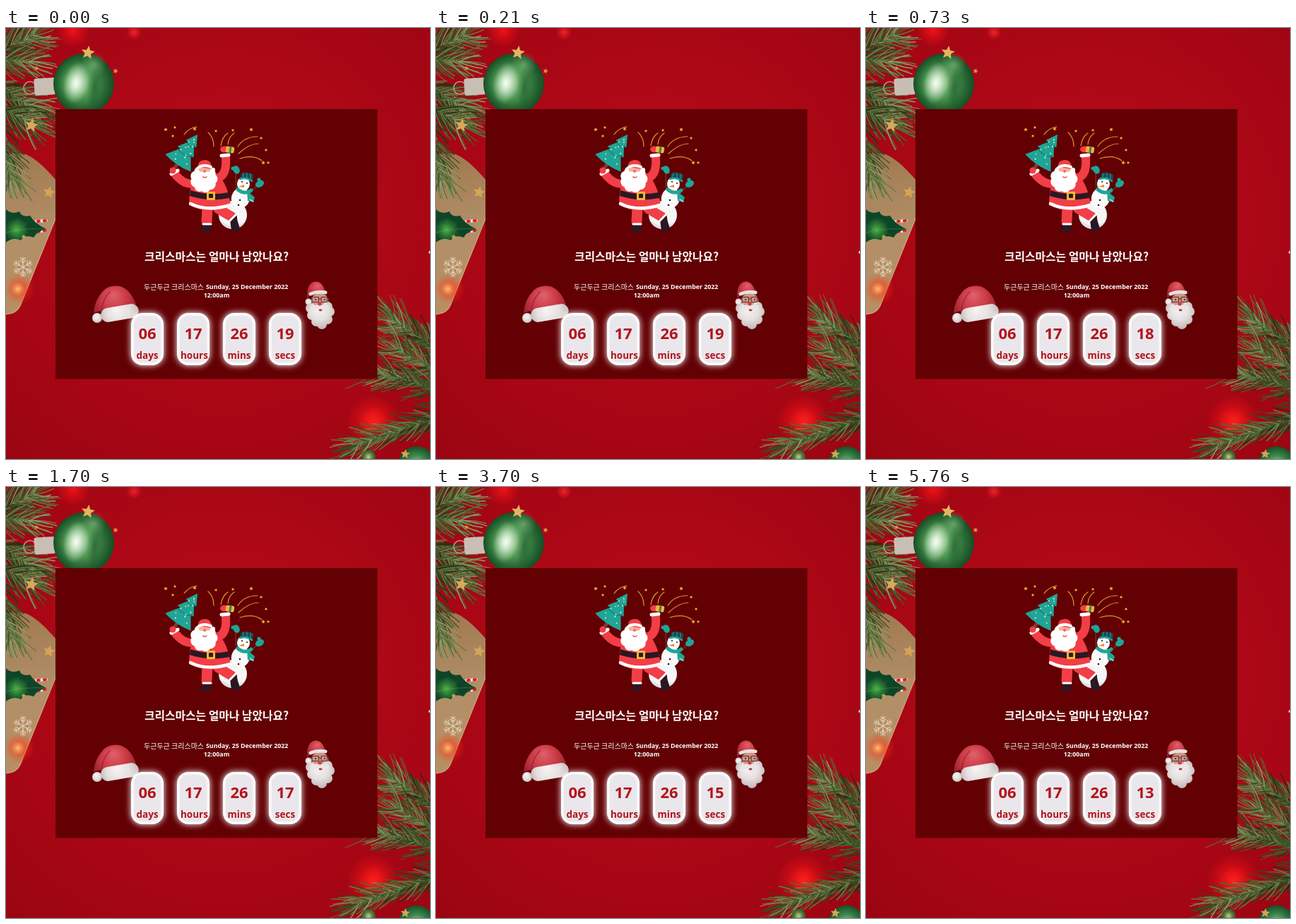
Write an HTML page with a canvas that moves like this. It is 600 px wide and 611 px high and loops after 5.94 s.

```html
<!DOCTYPE html>
<html lang="ko">
<head>
<meta charset="utf-8">
<title>Christmas countdown</title>
<style>
html, body { margin: 0; width: 100%; height: 100%; overflow: hidden; background: #a40613; }
canvas { display: block; }
</style>
</head>
<body>
<canvas id="stage" width="600" height="611"></canvas>
<script>
const W = 600, H = 611, LOOP = 5940;
const TICKS = [700, 1700, 2670, 3700, 4700, 5700];
const LATIN = '"Noto Sans", "Open Sans", sans-serif';
const HANGUL = '"Noto Sans CJK KR", "Noto Sans CJK", sans-serif';
const TEAL = '#1fa598', RED = '#f23e47', WHITE = '#fff', INK = '#2a1823', GOLD = '#f2b632';

const stage = document.getElementById('stage').getContext('2d');
const scene = document.createElement('canvas');
scene.width = W;
scene.height = H;
const c = scene.getContext('2d');

let seed = 7;
const rnd = () => (seed = (seed * 16807) % 2147483647) / 2147483647;
const range = (a, b) => a + (b - a) * rnd();

function radial(x, y, r, stops, x2 = x, y2 = y) {
  const g = c.createRadialGradient(x2, y2, 0, x, y, r);
  stops.forEach((s, i) => g.addColorStop(i / (stops.length - 1), s));
  return g;
}

function glow(x, y, r, rgb, a) {
  c.fillStyle = radial(x, y, r, [`rgba(${rgb},${a})`, `rgba(${rgb},${a * 0.45})`, `rgba(${rgb},0)`]);
  c.fillRect(x - r, y - r, 2 * r, 2 * r);
}

function oval(x, y, rx, ry, fill, turn = 0) {
  c.beginPath();
  c.ellipse(x, y, rx, ry, turn, 0, 7);
  c.fillStyle = fill;
  c.fill();
}

const dot = (x, y, r, fill) => oval(x, y, r, r, fill);

function shape(path, fill) {
  c.fillStyle = fill;
  c.fill(new Path2D(path));
}

function line(path, color, width) {
  c.strokeStyle = color;
  c.lineWidth = width;
  c.lineCap = c.lineJoin = 'round';
  c.stroke(new Path2D(path));
}

function at(x, y, turn, draw) {
  c.save();
  c.translate(x, y);
  c.rotate(turn);
  draw();
  c.restore();
}

function star(x, y, r, fill, turn = 0.1) {
  c.beginPath();
  for (let i = 0; i < 10; i++) {
    const d = i % 2 ? r * 0.45 : r, a = turn - Math.PI / 2 + i * Math.PI / 5;
    c.lineTo(x + d * Math.cos(a), y + d * Math.sin(a));
  }
  c.closePath();
  c.fillStyle = fill;
  c.fill();
}

function pill(x, y, w, h, r, fill) {
  c.beginPath();
  c.roundRect(x, y, w, h, r);
  c.fillStyle = fill;
  c.fill();
}

function softPill(x, y, w, h, r, fill, blur) {
  c.save();
  c.shadowColor = fill;
  c.shadowBlur = blur;
  pill(x, y, w, h, r, fill);
  c.restore();
}

function label(ctx, s, x, y, font, fill, align = 'center') {
  ctx.font = font;
  ctx.fillStyle = fill;
  ctx.textAlign = align;
  ctx.fillText(s, x, y);
}

const GREENS = ['#1f2f17', '#344a24', '#4a632f', '#687d45', '#8f9b6c'];

function sprig(x0, y0, x1, y1, len, n) {
  const dir = Math.atan2(y1 - y0, x1 - x0);
  line(`M${x0} ${y0}L${x1} ${y1}`, '#4d4124', 2.5);
  for (let i = 0; i < n; i++) {
    const k = i / n, side = i % 2 ? 1 : -1;
    const x = x0 + (x1 - x0) * k, y = y0 + (y1 - y0) * k;
    const a = dir + side * range(0.1, 0.95), l = len * range(0.6, 1.1);
    const b = a - side * 0.18;
    const shade = GREENS[Math.min(4, Math.floor(rnd() * 3.4 + k * 1.6))];
    line(`M${x} ${y}Q${x + l * 0.5 * Math.cos(a)} ${y + l * 0.5 * Math.sin(a)} ` +
      `${x + l * Math.cos(b)} ${y + l * Math.sin(b)}`, shade, range(0.8, 1.6));
  }
}

function backdrop() {
  c.fillStyle = radial(310, 270, 470, ['#b70b1b', '#b00918', '#a70614', '#990512']);
  c.fillRect(0, 0, W, H);
  glow(95, 3, 24, '246,18,24', 0.95);
  glow(181, 6, 11, '246,36,44', 0.95);
  dot(600, 318, 2, '#eed5d8');
}

function gift() {
  const g = c.createLinearGradient(0, 180, 40, 400);
  g.addColorStop(0, '#a1784f');
  g.addColorStop(0.5, '#b18f68');
  g.addColorStop(1, '#b98f62');
  shape('M0 178H24Q42 182 71 216V268L20 394Q15 405 0 406Z', g);
  line('M71 268L20 394Q15 405 0 406', '#cda77c', 1.2);
  star(61, 233, 9, '#d5a553', 0.2);
  c.lineCap = 'butt';
  line('M43 274L57 273M43 289L56 287', '#f3e6dc', 4);
  c.setLineDash([2, 7]);
  line('M45 274L57 273M45 289L56 287', '#d92027', 4);
  c.setLineDash([]);
  // holly
  shape('M0 257Q8 265 19 260Q22 269 34 266Q40 277 57 285Q44 288 39 297Q28 292 21 301Q10 296 0 304Z', '#0e4527');
  line('M0 290Q28 283 54 285', '#346848', 1);
  line('M8 289L18 269M20 287L31 274M10 290L19 298M25 287L34 293', '#225736', 1);
  glow(15, 286, 17, '96,214,80', 0.75);
  star(25, 296, 4, '#b7a44d');
  // snowflake
  for (let i = 0; i < 6; i++) at(24, 339, i * Math.PI / 3, () =>
    line('M0 0V-14M0 -6L-4 -10M0 -6L4 -10M0 -10L-3 -13M0 -10L3 -13', '#e0cdb6', 1.2));
  glow(19, 370, 22, '255,48,18', 0.85);
  glow(17, 370, 10, '255,225,130', 0.8);
}

function bauble() {
  c.beginPath();
  c.arc(34, 85, 9, 0, 7);
  c.strokeStyle = '#b99a8e';
  c.lineWidth = 1.5;
  c.stroke();
  const cap = c.createLinearGradient(0, 70, 0, 97);
  ['#c9beb4', '#b5aaa0', '#ebe4dc', '#8d8376'].forEach((s, i) => cap.addColorStop(i / 3, s));
  at(54, 83, -0.06, () => pill(-14, -12, 30, 24, 3, cap));
  dot(110, 79, 43, radial(110, 79, 43.5, ['#a8d6a1', '#7cb87a', '#4b934f', '#2a6c36', '#164a24'], 99, 78));
  at(99, 78, 0.2, () => {
    c.scale(0.6, 1);
    glow(0, 0, 30, '250,255,246', 0.95);
  });
  glow(124, 52, 18, '150,208,145', 0.5);
  at(125, 84, 0.1, () => {
    c.scale(0.35, 1);
    glow(0, 0, 30, '14,68,30', 0.5);
  });
  star(116, 35, 10, '#e3b45f', 0.15);
  star(155, 61, 4, '#d49345', 0.3);
}

function garland() {
  sprig(-15, 34, 40, 10, 43, 90);
  sprig(-20, 42, 34, 48, 43, 75);
  sprig(-20, 78, 40, 112, 44, 110);
  sprig(-18, 108, 38, 136, 44, 90);
  sprig(-18, 122, 8, 214, 44, 130);
  star(43, 57, 3.5, '#d29c49');
  star(36, 138, 10, '#dba85a', 0.2);

  glow(520, 558, 38, '255,20,22', 0.95);
  dot(581, 619, 26, radial(581, 619, 28, ['#a1cb92', '#39854a', '#124623']));
  sprig(625, 465, 545, 412, 44, 130);
  sprig(625, 500, 555, 455, 44, 100);
  sprig(625, 515, 520, 488, 44, 130);
  sprig(630, 545, 495, 592, 42, 160);
  glow(520, 558, 22, '255,45,35', 0.45);
  dot(513, 608, 10, radial(513, 608, 12, ['#bcd58c', '#56763d', '#23451f']));
  star(565, 604, 7, '#d4a454');
}

function tree() {
  at(271, 151, 0.6, () => {
    c.fillStyle = '#7c3a2b';
    c.fillRect(-2.5, 46, 5, 16);
    shape('M0 0L9 16L5 16L14 30L9 30L22 49Q0 54 -22 49L-9 30L-14 30L-5 16L-9 16Z', TEAL);
    line('M-6 18Q1 22 8 16M-10 33Q2 37 12 30', '#137f78', 1.2);
    for (let i = 0; i < 13; i++) {
      const y = 9 + i * 3.1;
      dot(Math.sin(i * 2.4) * y * 0.27, y, 1, i % 3 ? '#f6dc80' : '#eef8ef');
    }
  });
}

function fireworks() {
  const streaks = 'M252 151Q258 142 270 140M286 148Q294 155 294 168M304 167Q306 154 314 149' +
    'M314 165Q315 154 323 149M328 168Q337 154 356 154M329 178Q344 164 357 164M331 185Q350 179 362 188';
  line(streaks, '#d9982f', 1.2);
  const spots = [[226, 144], [239, 141], [236, 153], [267, 143], [297, 146], [321, 145],
    [347, 144], [361, 156], [368, 173], [364, 191], [371, 191]];
  spots.forEach(([x, y], i) => star(x, y, i % 3 ? 2.4 : 3, GOLD, i));
}

function snowman() {
  line('M326 237L325 207M344 235L357 222', '#5d392e', 1.5);
  dot(321, 265, 20, '#f5f5f6');
  oval(332, 241, 13, 15, '#fafafa', 0.3);
  shape('M304 273Q320 287 338 275Q331 287 317 284Q308 282 304 273Z', '#dfe2e8');
  oval(336, 221, 9, 10, WHITE);
  shape('M331 215L333 206Q342 203 350 208L349 218Q340 212 331 215Z', '#164b54');
  line('M331 214Q340 211 348 217', TEAL, 2.5);
  line('M336 206L335 211M341 206L341 212M346 207L346 213', TEAL, 1);
  line('M328 229Q338 237 347 230', TEAL, 5);
  shape('M341 231L352 240L350 247L342 245Z', TEAL);
  line('M345 243L350 246', '#dceae4', 1.2);
  shape('M337 222L329 225L337 226Z', '#ef8638');
  dot(334, 218, 1.1, INK);
  dot(341, 220, 1.1, INK);
  dot(331, 244, 1.3, INK);
  dot(329, 251, 1.3, INK);
  oval(326, 201, 4.5, 6, TEAL, -0.4);
  dot(321, 199, 2.5, TEAL);
  oval(359, 221, 6.5, 4.5, TEAL, -0.5);
  dot(358, 215, 2.6, TEAL);
}

function santa() {
  line('M268 220Q253 224 240 208', RED, 12);
  line('M297 213Q313 211 311 184', RED, 12);
  line('M234 207L243 202M305 181L315 180', WHITE, 5);
  dot(236, 202, 4.5, RED);
  oval(309, 172, 6, 4.5, RED);
  at(317, 172, 0.15, () => {
    pill(-6, -4, 12, 9, 2, GOLD);
    c.fillStyle = '#31836b';
    c.fillRect(-1, -4, 3, 9);
  });
  line('M285 253L284 274', RED, 15);
  line('M300 256L320 268', RED, 14);
  shape('M278 279H290V289H275Q275 285 279 284Z', INK);
  shape('M317 273L326 264Q327 274 331 284L327 289L319 287Z', INK);
  line('M279 278H290M316 274L326 264', WHITE, 3);
  shape('M266 207Q259 230 259 251Q284 265 318 253Q315 224 300 207Q281 200 266 207Z', RED);
  line('M261 249Q285 261 317 251', WHITE, 4.5);
  shape('M261 230Q287 239 315 233L316 241Q287 247 260 238Z', INK);
  pill(284, 232, 12, 12, 1, GOLD);
  pill(287, 235, 6, 6, 1, INK);
  // head and beard
  for (let i = 0; i < 9; i++) {
    const a = i * Math.PI * 2 / 9;
    dot(280 + 12 * Math.cos(a), 214 + 12 * Math.sin(a), 7.5, WHITE);
  }
  oval(280, 216, 15, 15, WHITE);
  oval(281, 200, 8.5, 6, '#f5b39e');
  shape('M272 197Q271 187 283 187Q292 189 291 200Z', RED);
  line('M273 197Q281 193 290 197', WHITE, 4);
  dot(293, 201, 3, WHITE);
  oval(276, 207, 6, 3.2, WHITE, -0.2);
  oval(287, 207, 6, 3.2, WHITE, 0.2);
  dot(281, 203, 2, '#e9716b');
  line('M279 211Q281 213 284 211', '#d84350', 1.5);
}

const FUR = ['#f8f4f4', '#e6e0e0', '#b9adae'];
const FELT = ['#e2606a', '#c93a46', '#8d1a26'];

function hat() {
  shape('M124 404Q125 386 138 372Q147 364 161 366Q176 370 184 392L141 406L133 401Z',
    radial(154, 388, 36, FELT, 152, 378));
  line('M135 400Q137 384 147 374', 'rgba(118,5,22,.35)', 2);
  dot(129, 411, 7, radial(129, 411, 9, FUR, 127, 408));
  at(161, 404, -0.17, () =>
    pill(-27, -10, 54, 20, 10, radial(0, 0, 32, FUR, -4, -6)));
}

function head() {
  shape('M426 384Q425 366 433 361Q446 355 452 374L431 378Z', radial(440, 370, 18, FELT, 441, 365));
  oval(444, 386, 12, 10, '#d29484');
  const fur = radial(445, 404, 26, FUR, 441, 398);
  const tufts = [[431, 397], [433, 407], [439, 416], [447, 420], [455, 413], [458, 402], [455, 395], [445, 406]];
  tufts.forEach(([x, y]) => dot(x, y, 7, fur));
  oval(445, 406, 11, 12, fur);
  oval(439, 396, 7, 3.5, '#ebe5e5', -0.25);
  oval(450, 396, 7, 3.5, '#ebe5e5', 0.25);
  dot(428, 388, 4.5, radial(428, 388, 6, FUR));
  line('M431 377Q441 373 452 375', '#e6e0e0', 5);
  c.strokeStyle = '#4a3034';
  c.lineWidth = 1;
  c.strokeRect(433.5, 381.5, 9, 7);
  c.strokeRect(446.5, 381.5, 8, 7);
  line('M442 384H446', '#4a3034', 1);
  dot(438, 385, 1, INK);
  dot(451, 385, 1, INK);
  dot(444, 391, 2.6, '#cf3a3e');
  oval(445, 400, 2.5, 1.4, '#9d4048');
}

const CRIMSON = '#b5131b', FACE = '#e9e7eb', CONTENT = 36;

function box(x, name, value) {
  softPill(x - 23, 404, 46, 74, 16, WHITE, 10);
  softPill(x - 19, 408, 38, 66, 12, FACE, 5);
  c.font = `bold 13.5px ${LATIN}`;
  const left = x - Math.min(CONTENT, c.measureText(name).width) / 2;
  label(c, name, left, 469, c.font, CRIMSON, 'left');
  if (value) digits(c, value, x);
}

function digits(ctx, value, x) {
  label(ctx, value, x, 441, `bold 22px ${LATIN}`, CRIMSON);
}

function paint() {
  backdrop();
  gift();
  garland();
  bauble();
  c.fillStyle = '#620003';
  c.fillRect(70, 115, 455.5, 382.5);
  fireworks();
  tree();
  snowman();
  santa();
  label(c, '크리스마스는 얼마나 남았나요?', 298, 330, `bold 15.8px ${HANGUL}`, WHITE);
  label(c, '두근두근 크리스마스', 195, 370.5, `500 10px ${HANGUL}`, WHITE, 'left');
  label(c, 'Sunday, 25 December 2022', 283, 370, `bold 8.8px ${LATIN}`, WHITE, 'left');
  label(c, '12:00am', 298, 382, `bold 8.8px ${LATIN}`, WHITE);
  hat();
  head();
  box(200, 'days', '06');
  box(265, 'hours', '17');
  box(330, 'mins', '26');
  box(395, 'secs');
}

paint();
const start = performance.now();

function frame(now) {
  const t = Math.max(0, now - start) % LOOP;
  const secs = 19 - TICKS.filter(k => t >= k).length;
  stage.drawImage(scene, 0, 0);
  digits(stage, String(secs), 395);
  requestAnimationFrame(frame);
}
frame(start);
</script>
</body>
</html>
```
